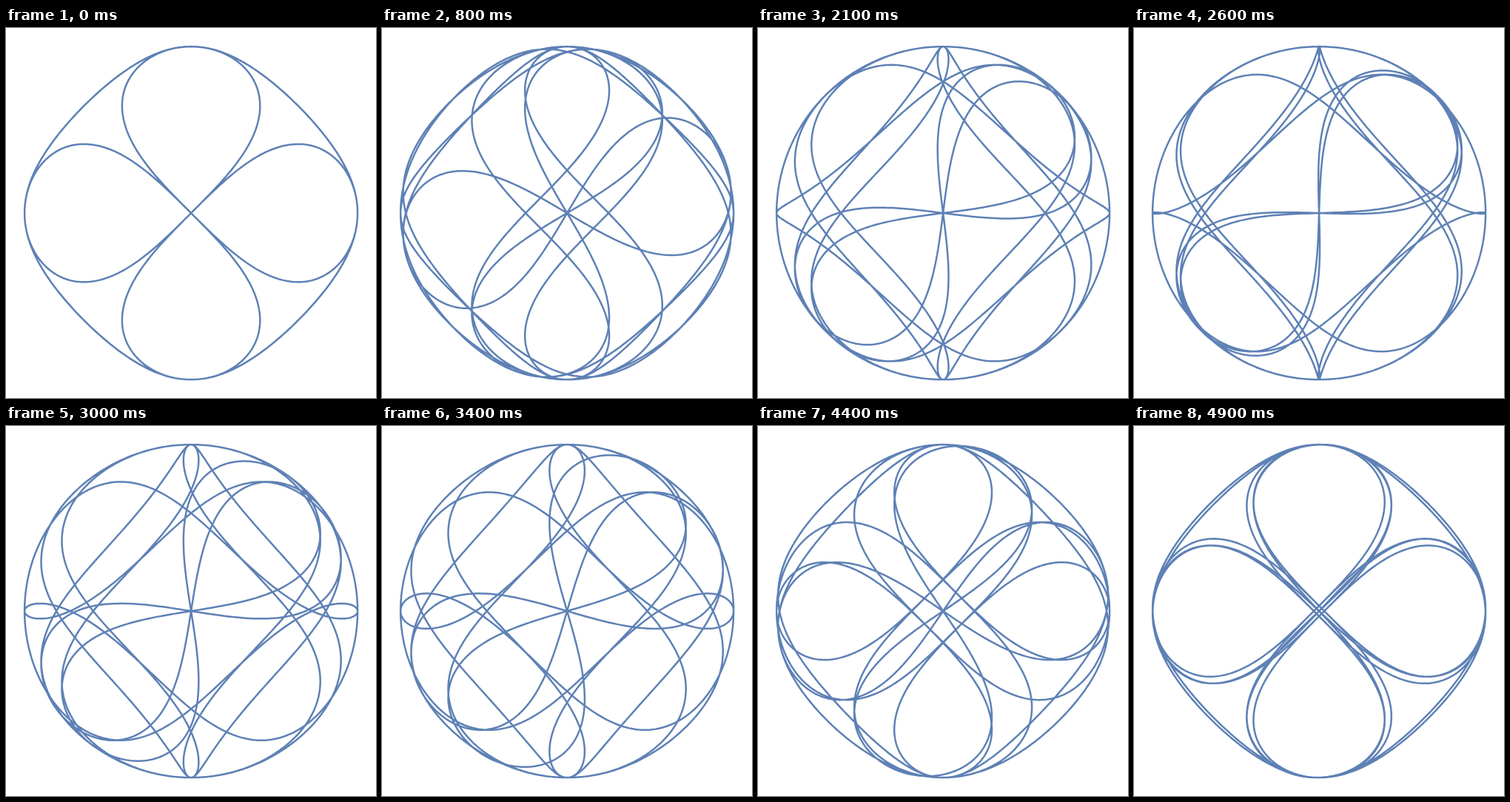
An HTML page for the animation above (5000 ms loop, 500 by 500 pixels).

```html
<!DOCTYPE html>
<html lang="en">
<head>
<meta charset="utf-8">
<title>Rotating sphere curves</title>
<style>
  html, body { margin: 0; width: 100%; height: 100%; overflow: hidden; background: #fff; }
  svg { display: block; width: 100%; height: 100%; }
</style>
</head>
<body>
<svg viewBox="0 0 500 500">
  <path id="curves" fill="none" stroke="#5e81b5" stroke-width="2.5" stroke-linejoin="round"/>
</svg>
<script>
const LOOP = 5000, STEP = 100, TURN = Math.PI / 2;
const CENTER = 250.1, RADIUS = 225, POINTS = 360;
const path = document.getElementById('curves');

// The curve y = xz on the unit sphere, turned about the x axis by `tilt`, seen along z.
function saddle(tilt) {
  return Array.from({ length: POINTS }, (_, i) => {
    const u = i / POINTS * 2 * Math.PI;
    const x = Math.sin(u);
    return [x, Math.cos(u) * Math.sin(Math.atan(x) + tilt)];
  });
}

const swap = points => points.map(([x, y]) => [y, x]);

function spin(points, angle) {
  const c = Math.cos(angle), s = Math.sin(angle);
  return points.map(([x, y]) => [c * x - s * y, s * x + c * y]);
}

function toPath(points) {
  const coords = points.map(([x, y]) =>
    (CENTER + RADIUS * x).toFixed(2) + ' ' + (CENTER - RADIUS * y).toFixed(2));
  return 'M' + coords.join('L') + 'Z';
}

function draw(time) {
  const angle = Math.floor(time % LOOP / STEP) * STEP / LOOP * TURN;
  const outer = [saddle(TURN + angle), saddle(TURN - angle)];
  const inner = [saddle(angle), saddle(-angle)];
  const eight = spin(saddle(0), angle);
  const curves = [
    ...outer,                            // about the x axis
    ...outer.map(swap), ...inner.map(swap), // about the y axis
    eight, swap(eight)                   // about the viewing axis
  ];
  path.setAttribute('d', curves.map(toPath).join(''));
}

const start = performance.now();
function tick() {
  draw(performance.now() - start);
  requestAnimationFrame(tick);
}
tick();
</script>
</body>
</html>
```
